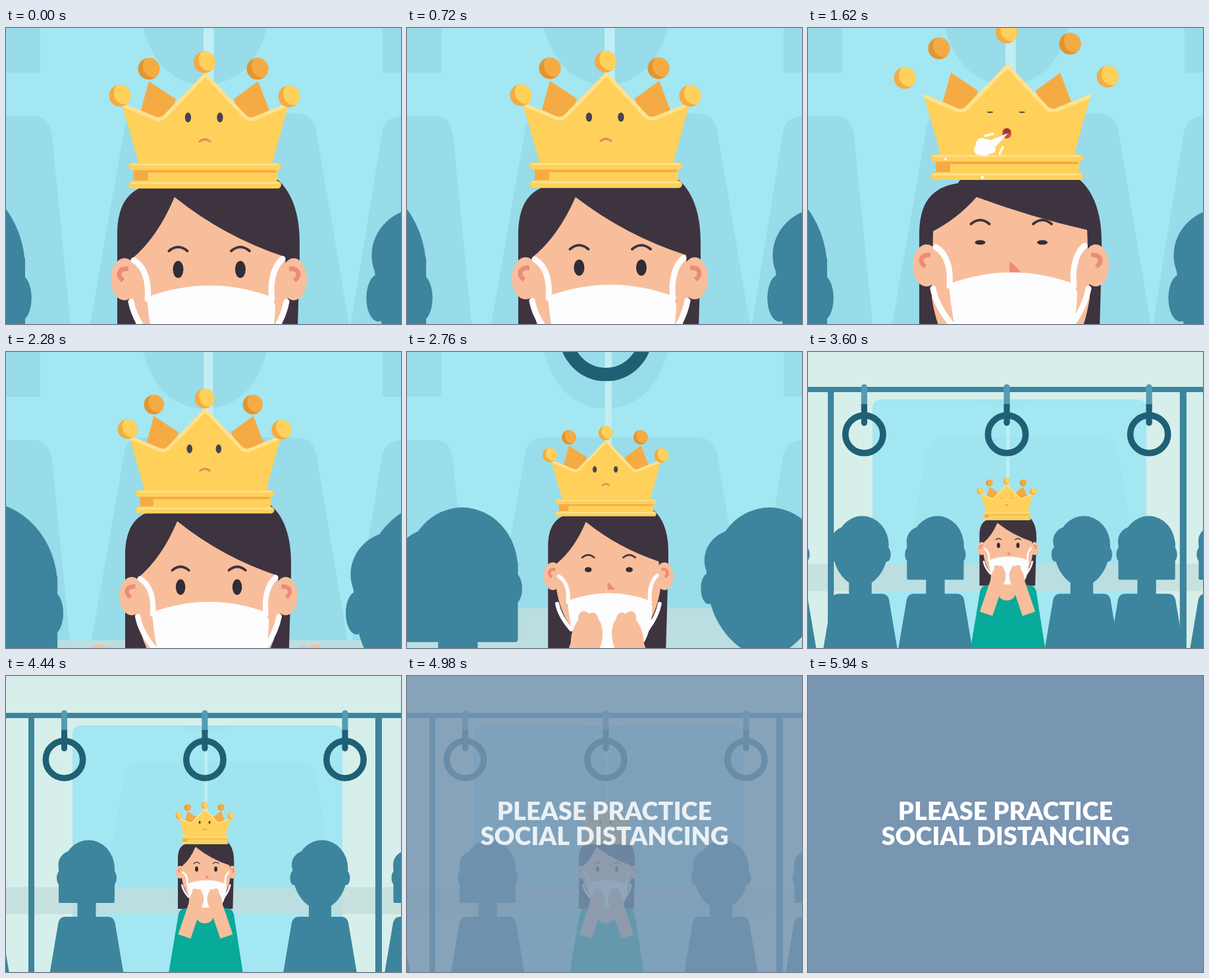
An HTML page with a canvas for the animation above (6000 ms loop, 600 by 450 pixels).

```html
<!DOCTYPE html>
<html lang="en">
<head>
<meta charset="utf-8">
<title>Social distancing</title>
<style>
html, body { margin: 0; width: 100%; height: 100%; overflow: hidden; background: #a3e7f3; }
canvas { display: block; width: 100vw; height: 100vh; }
</style>
</head>
<body>
<canvas id="stage" width="600" height="450"></canvas>
<script>
const ctx = document.getElementById('stage').getContext('2d');
const LOOP = 6000, STEP = 60, CX = 302, CY = 261, CLOSE = 3.25;
const C = {
  wall: '#d6efea', glass: '#a3e7f3', ghost: '#98dbe9', seat: '#bbdee1', sill: '#c7e1de',
  steel: '#3d849e', strap: '#549bb4', ring: '#1f6074', hair: '#3d3440', skin: '#f8be9b',
  pink: '#ea8c79', shirt: '#08aa99', gold: '#ffd15a', shine: '#ffe291', amber: '#f5ab43',
  rust: '#e3952f', ink: '#322c36', white: '#fdfdff', blue: '#7895b2'
};

const clamp = v => Math.max(0, Math.min(1, v));
const sine = p => (1 - Math.cos(Math.PI * clamp(p))) / 2;
const cubic = p => (p = clamp(p), p < .5 ? 4 * p ** 3 : 1 - (2 - 2 * p) ** 3 / 2);

// Eased interpolation through [time, value] pairs.
function key(t, ...points) {
  let [t0, v0] = points[0];
  for (const [t1, v1] of points) {
    if (t < t1) return t1 === t0 ? v0 : v0 + (v1 - v0) * sine((t - t0) / (t1 - t0));
    t0 = t1; v0 = v1;
  }
  return v0;
}

function fill(path, color) {
  ctx.fillStyle = color;
  ctx.fill(new Path2D(path));
}
function line(path, color, width, cap = 'round') {
  ctx.strokeStyle = color;
  ctx.lineWidth = width;
  ctx.lineCap = cap;
  ctx.lineJoin = 'round';
  ctx.stroke(new Path2D(path));
}
function oval(x, y, rx, ry, color, turn = 0) {
  ctx.fillStyle = color;
  ctx.beginPath();
  ctx.ellipse(x, y, rx, ry, turn, 0, 7);
  ctx.fill();
}
function box(x, y, w, h, color, r = 0) {
  ctx.fillStyle = color;
  ctx.beginPath();
  ctx.roundRect(x, y, w, h, r);
  ctx.fill();
}
function group(draw) {
  ctx.save();
  draw();
  ctx.restore();
}
function zoom(s) {
  ctx.translate(CX, CY);
  ctx.scale(s, s);
  ctx.translate(-CX, -CY);
}

function reflections(z, t) {
  group(() => {
    zoom(z);
    ctx.beginPath();
    ctx.roundRect(101, 75, 410, 247, 12);
    ctx.resetTransform();
    ctx.clip();
    ctx.globalAlpha = key(t, [2300, 1], [3600, .3]);
    box(0, 0, 52, 68, C.ghost);
    box(572, 0, 28, 68, C.ghost);
    fill('M208 0 C225 60 260 86 302 86 S380 60 396 0Z', C.ghost);
    fill('M0 134 H44 Q66 134 70 165 L98 450 H0Z', C.ghost);
    fill('M128 450 L180 152 Q184 130 210 130 H440 Q466 130 471 155 L521 450Z', C.ghost);
    fill('M524 450 L571 160 Q574 136 600 134 V450Z', C.ghost);
  });
}

function carriage(z, t) {
  group(() => {
    zoom(z);
    box(101, 75, 410, 247, C.glass, 12);
  });
  reflections(z, t);
  group(() => {
    zoom(z);
    box(301.4, 75, 4.8, 130, '#c0eef4');
    box(-50, 321, 700, 41, C.sill);
    box(101, 321, 410, 41, C.seat);
    box(101, 362, 410, 100, C.glass);
    box(34, 60, 9, 400, C.steel);
    box(561, 60, 10, 400, C.steel);
    box(-50, 56, 700, 8, C.steel);
    for (const x of [88.5, 302, 515]) {
      line(`M${x} 56.5 V84`, C.strap, 9);
      line(`M${x} 82 V110`, C.ring, 9, 'butt');
      oval(x, 110, 4.5, 4.5, C.ring);
      ctx.strokeStyle = C.ring;
      ctx.lineWidth = 9.5;
      ctx.beginPath();
      ctx.arc(x, 127, 28.2, 0, 7);
      ctx.stroke();
    }
  });
}

function passenger(x, bob) {
  group(() => {
    ctx.translate(x, 0);
    oval(-40, 307, 5.5, 11, C.steel);
    oval(40, 307, 5.5, 11, C.steel);
    oval(-20, 287, 23, 22, C.steel);
    oval(3, 293, 39.5, 43.5, C.steel);
    if (bob) box(-42.5, 287, 85, 58, C.steel, 2);
    else fill('M-42 290 L-40 312 C-36 335 -18 355 0 355 S36 335 40 312 L42 290Z', C.steel);
    box(bob ? -14 : -17, 335, bob ? 28 : 34, 35, C.steel);
    fill('M-56 452 L-43 375 Q-41 366 -32 366 H32 Q41 366 43 375 L56 452Z', C.steel);
  });
}

function crowd(t) {
  const near = 1 - sine((t - 1800) / 1200);
  const left = cubic((t - 3380) / 900), right = cubic((t - 3520) / 800);
  const people = [
    [-27, -200, true], [91, -142, false], [199.5, -77, true],
    [414, 63, false], [511, 120, true], [631, 180, true]
  ];
  for (const [x, away, bob] of people) {
    const shift = away < 0 ? -24 * near + away * left : 9 * near + away * right;
    passenger(x + shift, bob);
  }
}

function head(t, up) {
  const lift = 41 * up;
  fill('M169 563 V315 C169 265 188 242 228 236 Q232 226 250 222 H400 C430 238 446 275 446 325 V350 L440 563Z', C.hair);
  oval(180, 382 - 21 * up, 21, 32, C.skin);
  oval(437, 382 - 21 * up, 20, 32, C.skin);
  const earY = 375 - 21 * up;
  line(`M186 ${earY - 9} C170 ${earY - 10} 168 ${earY + 2} 178 ${earY + 9}`, C.pink, 7, 'butt');
  line(`M430 ${earY - 9} C446 ${earY - 10} 448 ${earY + 2} 438 ${earY + 9}`, C.pink, 7, 'butt');
  box(263, 500, 82, 110, C.skin);
  fill(`M256 257 Q${230 - 2 * up} ${319 - 30 * up} 190 ${352 - 43 * up}
    L188 410 Q204 515 285 543 Q310 550 335 543 Q412 515 428 410
    L424 ${348 - 41 * up} Q${332 + 8 * up} ${318 - 30 * up} 256 257Z`, C.skin);

  group(() => {
    ctx.translate(0, -lift);
    const blink = key(t, [2700, 0], [2790, 1], [2880, 0]);
    const open = 13 - 9.5 * Math.max(up, blink);
    for (const x of [261.5, 356]) {
      oval(x, 367, 8, open, C.ink);
      line(`M${x - 14} 339 Q${x} 327 ${x + 14} 339`, C.hair, 4);
    }
    fill('M306 396 Q309 396 324 413 H306Z', C.pink);
  });

  group(() => {
    ctx.translate(0, key(t, [2280, 0], [2800, 30]) - 20 * up);
    fill('M214 409 Q310 374 404 409 L409 422 C408 480 390 520 360 535 Q310 550 262 535 C232 520 220 480 214 409Z', C.white);
    line('M194 353 C213 364 217 390 215 412', C.white, 9);
    line('M420 351 C405 364 401 390 404 412', C.white, 9);
    line('M190 416 Q195 444 222 475', C.white, 9);
    line('M426 416 Q421 444 398 475', C.white, 9);
  });
}

function body(t) {
  fill('M247 452 L262 362 Q264 353 275 353 H333 Q344 353 346 362 L360 452Z', C.shirt);
  fill('M288 352 H316 V362 Q314 376 302 376 T288 362Z', C.skin);
  const out = key(t, [2250, 1], [2800, 0]), drop = key(t, [1900, 70], [2280, 0]);
  for (const side of [-1, 1]) group(() => {
    ctx.translate(303 + side * 40 * out, drop);
    ctx.scale(side, 1);
    line('M15 346 L32 396', C.skin, 20, 'butt');
    oval(14, 342, 11, 17, C.skin, -.2);
    line('M10 328 L8 338 M16 327 V340', C.skin, 8);
  });
}

function ball(x, y, back) {
  group(() => {
    ctx.beginPath();
    ctx.arc(x, y, 16.5, 0, 7);
    ctx.clip();
    box(x - 18, y - 18, 36, 36, back ? C.rust : C.amber);
    oval(x + 7, y - 4, 16, 17, back ? C.amber : C.gold);
  });
}

function spray(t) {
  const p = clamp((t - 1500) / 120), fade = 1 - clamp((t - 1720) / 180);
  if (!p || !fade) return;
  group(() => {
    ctx.globalAlpha = fade;
    ctx.translate(302, 175);
    const far = p + .25 * clamp((t - 1620) / 240);
    ctx.scale(far, far);
    fill('M2 -2 L-37 13 L-22 24Z', C.white);
    for (const [x, y, r] of [[-38, 14, 9], [-42, 23, 8], [-34, 24, 9], [-24, 22, 7], [-29, 16, 9]])
      oval(x, y, r, r, C.white);
    line('M-33 2 L-21 -1 M-11 29 L-6 19', C.white, 3.5);
    oval(-93, 37, 2, 2, C.white);
    oval(-37, 65, 2.5, 2.5, C.white);
  });
}

function crown(t, up) {
  const burst = key(t, [1480, 0], [1620, 1], [1940, 0]);
  const blink = Math.max(up, key(t, [3480, 0], [3570, 1], [3630, 1], [3720, 0]));
  group(() => {
    ctx.translate(0, -13 * up);
    fill('M217 81 L258 108 L245 150 L204 128Z', C.amber);
    fill('M383 81 L346 108 L360 150 L401 128Z', C.amber);
    ball(217 - 18 * burst, 62 - 18 * burst, true);
    ball(382 + 16 * burst, 62 - 25 * burst, true);

    const edge = 'M175 113 L227 135 Q235 138 241 131 L303 67 L363 131 Q369 138 377 135 L430 113';
    const shape = edge + ' L404 207 H202Z';
    fill(shape, C.gold);
    group(() => {
      ctx.clip(new Path2D(shape));
      line(edge, C.shine, 11);
    });
    box(194, 214, 218, 20, C.gold);
    box(194, 216, 22, 16, C.amber);
    box(194, 216, 216, 4, C.amber);
    for (const y of [205, 233]) {
      box(186, y, 232, 11, C.gold, 5.5);
      line(`M191 ${y + 2.5} H413`, C.shine, 2.5);
    }
    ball(173 - 26 * burst, 103 - 14 * burst);
    ball(301.5, 52 - 32 * burst);
    ball(430 + 25 * burst, 104 - 17 * burst);

    const eyeY = 136 + 5 * up;
    for (const x of [276.5, 325]) oval(x, eyeY, 4.7, 7.5 - 6.5 * blink, '#48424f');
    if (burst > .1) {
      oval(302, 173, 7 * burst, 8 * burst, '#c9503f');
      oval(302, 170, 5 * burst, 4 * burst, '#9d3a37');
    } else line('M294 172.5 Q302 166 310 172.5', '#e68a5f', 3.5);
    spray(t);
  });
}

function title(alpha) {
  if (!alpha) return;
  group(() => {
    ctx.globalAlpha = alpha;
    box(0, 0, 600, 450, C.blue);
    ctx.fillStyle = '#fff';
    ctx.font = '900 38px Lato, sans-serif';
    ctx.textAlign = 'center';
    ctx.fillText('PLEASE PRACTICE', 300, 219);
    ctx.fillText('SOCIAL DISTANCING', 300, 257);
  });
}

function render(now) {
  const t = Math.floor((now % LOOP) / STEP) * STEP;
  const z = CLOSE + (1 - CLOSE) * sine((t - 1845) / 1850);
  const up = key(t, [600, 0], [1320, 1], [1640, 1], [1920, 0]);
  box(0, 0, 600, 450, C.wall);
  carriage(z, t);
  group(() => {
    zoom(z);
    crowd(t);
    group(() => { zoom(1 / CLOSE); head(t, up); });
    body(t);
    zoom(1 / CLOSE);
    crown(t, up);
  });
  title(clamp((t - 4680) / 360));
}

let start;
function tick(now) {
  start ??= now;
  render(now - start);
  requestAnimationFrame(tick);
}
render(0);
requestAnimationFrame(tick);
</script>
</body>
</html>
```
